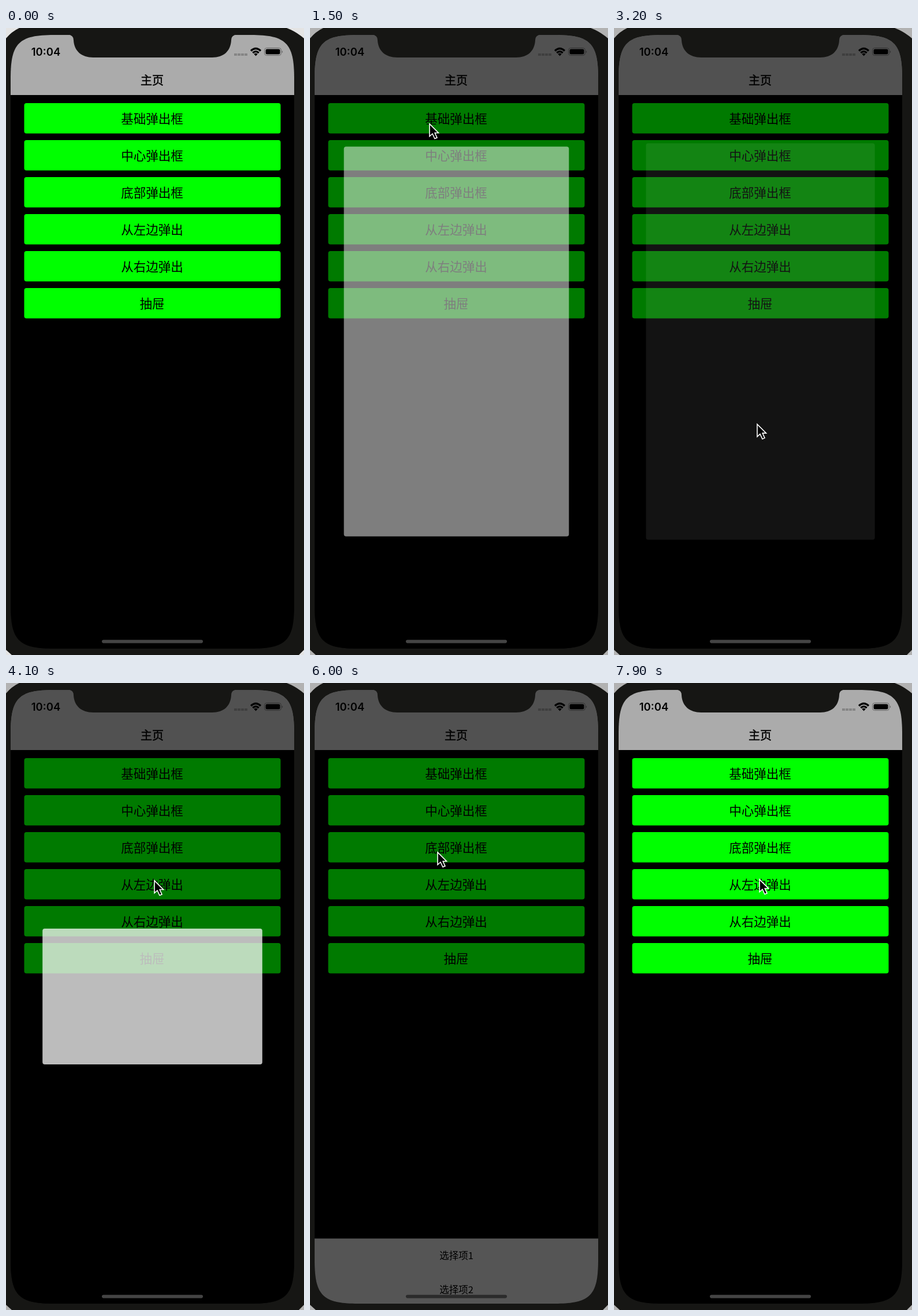
An HTML page that plays this animation: 516x1085 px, repeating every 8000 ms.

```html
<!DOCTYPE html>
<html lang="zh-CN">
<head>
<meta charset="utf-8">
<style>
html, body { margin: 0; height: 100%; overflow: hidden; background: #161614; }
svg { display: block; width: 516px; height: 1085px; }
text { text-anchor: middle; font-family: "Noto Sans CJK SC", "Noto Sans CJK", "Noto Sans CJK JP", sans-serif; }
.time { font: 600 18.5px Inter, sans-serif; }
.title { font-size: 20px; font-weight: 500; stroke: #000; stroke-width: .5; }
#buttons text { font-size: 21.5px; }
#sheet text { font-size: 16.5px; }
</style>
</head>
<body>
<svg viewBox="0 0 516 1085">
  <defs>
    <clipPath id="screen">
      <path d="M8 87C8 26 22 12 83 12H424C485 12 499 26 499 87V999C499 1060 485 1074 424 1074H83C22 1074 8 1060 8 999Z"/>
    </clipPath>
  </defs>
  <path id="desktop" d="M0 0H23Q10 6 0 18ZM486 0H516V18Q502 6 486 0ZM0 1076L10 1085H0ZM516 1076V1085H507Z"/>
  <g clip-path="url(#screen)">
    <rect x="8" y="12" width="491" height="1062"/>
    <rect x="8" y="12" width="491" height="104" fill="#ababab"/>
    <text class="time" x="69" y="48">10:04</text>
    <text class="title" x="253" y="97.5">主页</text>
    <path d="M395 46h23" stroke="#858585" stroke-width="4" stroke-dasharray="5 1"/>
    <path d="M424 39.5Q432.5 31.5 441 39.5M427.3 43Q432.5 38.4 437.7 43" fill="none" stroke="#000" stroke-width="3.2"/>
    <path d="M429.3 45Q432.5 42.5 435.7 45L432.5 48.5Z"/>
    <rect x="447.5" y="34.5" width="29" height="13" rx="4" fill="none" stroke="#666"/>
    <rect x="449.5" y="36.5" width="25" height="9" rx="2.5"/>
    <path d="M478 39Q480 41 478 43.5Z" fill="#555"/>
    <g id="buttons"></g>
    <rect id="dim" x="8" y="12" width="491" height="1062" opacity=".52"/>
    <rect id="popup" rx="4" fill="#fdfdfd"/>
    <g id="sheet"><rect x="8" width="491" height="337" fill="#fff"/></g>
    <rect id="homeBar" x="166" y="1058.8" width="175" height="5.6" rx="2.8"/>
  </g>
  <path d="M107 11.5Q117 12 117 21C118 40 131 51 151 51H357C377 51 389 40 390 21Q390 12 400 11.5Z" fill="#161614"/>
  <g id="cursor">
    <g id="ring" fill="none" stroke="#fff" stroke-width="1.1">
      <circle cx="1" cy="2" r="33"/><circle cx="1" cy="2" r="30.5"/>
    </g>
    <path d="M0 1V22.5L5 18L9 26.5L13 24.8L9.2 16.5H15.5Z" stroke="#fff" stroke-width="1.6"/>
  </g>
</svg>
<script>
const $ = id => document.getElementById(id);
const LOOP = 8000, STEP = 100, SHEET = 337;

$('buttons').innerHTML = ['基础弹出框', '中心弹出框', '底部弹出框', '从左边弹出', '从右边弹出', '抽屉']
  .map((label, i) => `<rect x="31.5" y="${130 + 64 * i}" width="444" height="52.5" rx="4" fill="#0f0"/>
    <text x="253" y="${165 + 64 * i}">${label}</text>`).join('');
for (let i = 0; i < 5; i++)
  $('sheet').innerHTML += `<text x="253.5" y="${35.5 + 59.4 * i}">选择项${i + 1}</text>`;

const layers = [
  { open: 1300, close: 2900, height: 637 },
  { open: 3780, close: 4600, height: 227 },
  { open: 5857, close: 7000, sheet: true },
];
const clicks = [1200, 2750, 3680, 4500, 5750, 6900];
// time, x, y of the pointer tip
const path = [
  [300, 530, 430], [1000, 207, 165], [1900, 207, 165], [2600, 241, 911], [2950, 241, 911],
  [3600, 262, 225], [3800, 262, 225], [4100, 257, 341], [4500, 222, 697], [4900, 222, 697],
  [5600, 221, 292], [6200, 221, 292], [6800, 225, 705], [7150, 225, 705], [7900, 252, 339],
];

// critically damped spring from 0 to 1
const spring = (ms, tau) => ms <= 0 ? 0 : 1 - (1 + ms / tau) * Math.exp(-ms / tau);
const progress = (layer, t, openTau, closeTau) => t > layer.close
  ? 1 - spring(t - layer.close, closeTau) : spring(t - layer.open, openTau);
const show = (el, on) => el.setAttribute('visibility', on ? 'visible' : 'hidden');
const set = (el, attrs) => { for (const k in attrs) el.setAttribute(k, attrs[k]); };

function pointerAt(t) {
  const i = path.findIndex(p => p[0] > t);
  if (i < 0) return path[path.length - 1].slice(1);
  if (i === 0) return null;
  const [a, b] = [path[i - 1], path[i]];
  const u = (t - a[0]) / (b[0] - a[0]), e = u * u * (3 - 2 * u);
  return [a[1] + (b[1] - a[1]) * e, a[2] + (b[2] - a[2]) * e];
}

function draw(t) {
  const layer = layers.find(l => t >= l.open && t < l.close + 400);
  const opacity = layer ? progress(layer, t, 120, 70) : 0;
  const sheetP = layer && layer.sheet ? opacity : 0;

  show($('dim'), layer);
  show($('popup'), layer && !layer.sheet);
  show($('sheet'), sheetP > 0);
  if (layer && !layer.sheet) {
    const scale = 1.1 - .1 * progress(layer, t, 142, 107);
    const w = 368 * scale, h = layer.height * scale;
    set($('popup'), { x: 253.5 - w / 2, y: 542.5 - h / 2, width: w, height: h, opacity });
  }
  set($('sheet'), { transform: `translate(0 ${1074 - SHEET * sheetP})`, opacity: sheetP });
  const bar = Math.max(0, 68 * (1 - 1.1 * sheetP));
  set($('homeBar'), { fill: `rgb(${bar},${bar},${bar})` });
  set($('desktop'), { fill: t < 1200 ? '#e4e4e4' : '#b2b2b2' });

  const tip = pointerAt(t);
  show($('cursor'), tip);
  if (tip) set($('cursor'), { transform: `translate(${tip})` });
  set($('ring'), { opacity: clicks.some(c => t >= c && t < c + 110) ? 1 : 0 });
}

function frame() {
  draw(Math.floor(performance.now() % LOOP / STEP) * STEP);
  requestAnimationFrame(frame);
}
frame();
</script>
</body>
</html>
```
